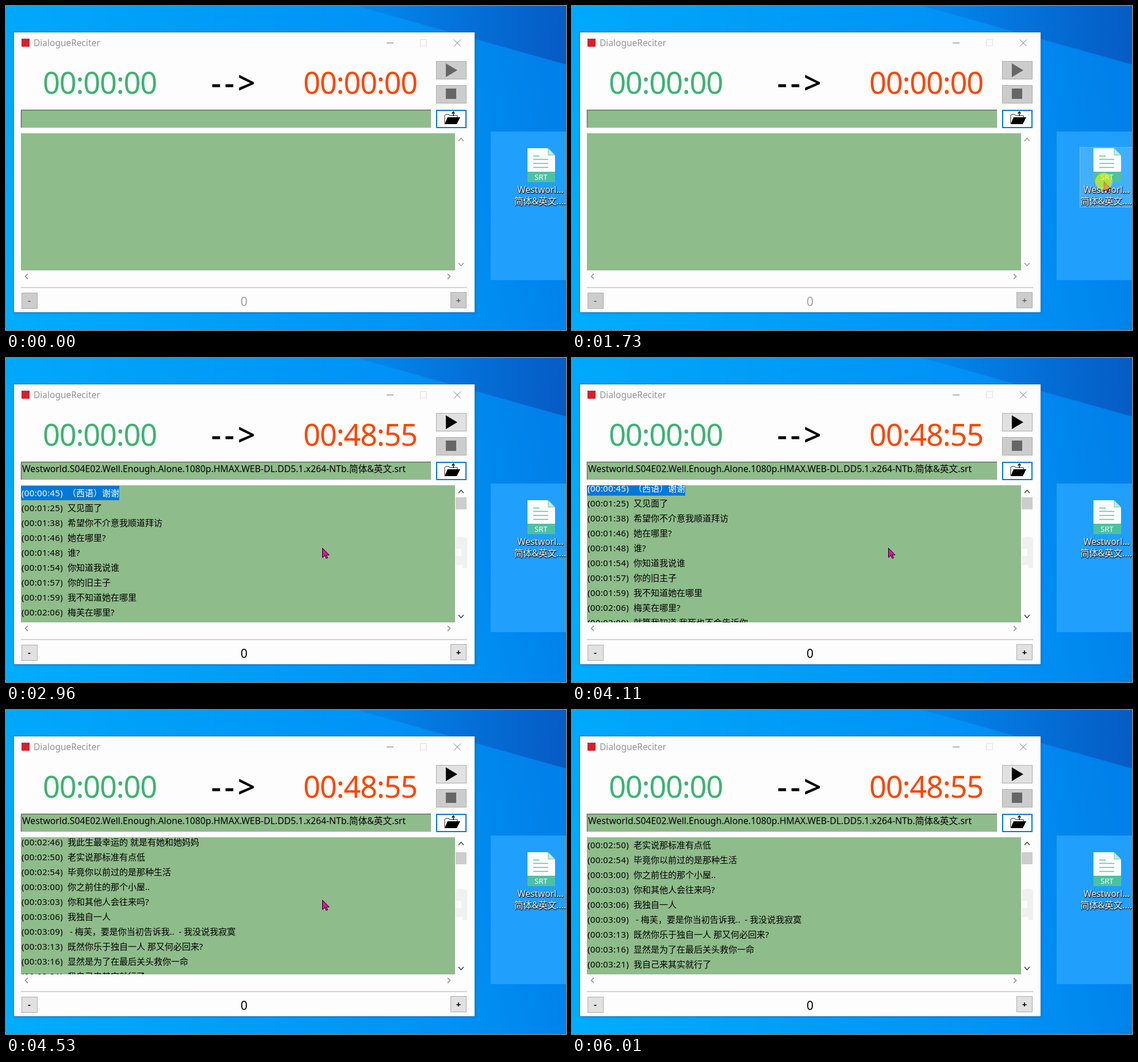
Animation, 974 px wide and 565 px high, one loop 6.47 s. Source, as an HTML page:

```html
<!DOCTYPE html>
<html lang="zh-CN">
<head>
<meta charset="utf-8">
<title>Subtitle player</title>
<style>
html, body { margin: 0; width: 100%; height: 100%; overflow: hidden; background: #0093f2; }
svg { display: block; font: 15px 'Noto Sans', 'Noto Sans CJK SC', sans-serif; --ink: #666; --face: #ccc; --arrow: #a0a0a0; }
svg.on { --ink: #000; --face: #e1e1e1; --arrow: #505050; }
text { white-space: pre; }
.big { font-size: 52.5px; letter-spacing: -1.3px; }
.mid { text-anchor: middle; }
.face { fill: var(--face); stroke: #adadad; }
.ink { fill: var(--ink); }
.chevron { fill: none; stroke: var(--arrow); stroke-width: 1.8; }
.side { fill: none; stroke: #a0a0a0; stroke-width: 1.8; }
.label { font-size: 15.5px; fill: #fff; text-shadow: 1px 1px 2px #000, 0 1px 1px #000; }
.loaded { visibility: hidden; }
.on .loaded { visibility: visible; }
</style>
</head>
<body>
<svg id="stage" width="974" height="565" viewBox="0 0 974 565">
  <defs>
    <linearGradient id="sky" gradientUnits="userSpaceOnUse" x1="0" y1="480" x2="974" y2="300">
      <stop offset="0" stop-color="#00acfc"/>
      <stop offset=".4" stop-color="#009df7"/>
      <stop offset=".75" stop-color="#0092f5"/>
      <stop offset="1" stop-color="#0080ea"/>
    </linearGradient>
    <linearGradient id="dusk" gradientUnits="userSpaceOnUse" x1="610" y1="0" x2="974" y2="30">
      <stop offset="0" stop-color="#0860cc" stop-opacity=".2"/>
      <stop offset="1" stop-color="#0850b8" stop-opacity=".75"/>
    </linearGradient>
    <clipPath id="listClip"><rect x="26" y="222" width="755" height="239"/></clipPath>
    <filter id="shadow" x="-5%" y="-5%" width="110%" height="112%">
      <feDropShadow dx="1" dy="1" stdDeviation="2" flood-color="#003a78" flood-opacity=".4"/>
    </filter>
  </defs>

  <!-- desktop -->
  <rect width="974" height="565" fill="url(#sky)"/>
  <path d="M610 0H974V102Z" fill="url(#dusk)"/>
  <rect x="843" y="219" width="259" height="259" fill="#20a0fc"/>

  <!-- file -->
  <rect id="hover" x="883.5" y="246.5" width="100" height="104" fill="#fff" fill-opacity=".16" stroke="#8fcfff" stroke-opacity=".7"/>
  <path d="M907 248H943L955 260V307H907Z" fill="#fcfefd"/>
  <path d="M943 248V260H955Z" fill="#bfe9dc" stroke="#50c3a5" stroke-width=".8"/>
  <path d="M907 289H955V307H907Z" fill="#4cc2a3"/>
  <path d="M917 261.500H928M917 267.500H943M917 274.500H943M917 281.500H943" stroke="#50c3a5" stroke-width="1.500"/>
  <text class="mid" x="930.500" y="303" font-size="13" fill="#fff">SRT</text>
  <text class="label mid" x="929.500" y="326">Westworl...</text>
  <text class="label mid" x="929" y="346">简体&amp;英文....</text>

  <!-- window -->
  <rect x="14" y="46" width="801" height="488" fill="#fdfdfd" filter="url(#shadow)"/>
  <rect x="13.500" y="45.500" width="802" height="489" fill="none" stroke="#1c6fae" stroke-opacity=".6"/>
  <rect x="27" y="57" width="14" height="14" fill="#d5202c"/>
  <text x="48" y="70" font-size="15.500" fill="#949494">DialogueReciter</text>
  <path d="M662 64.500H674M779 58.500L791 70.500M791 58.500L779 70.500" stroke="#777" fill="none"/>
  <rect x="720.500" y="58.500" width="11" height="11" fill="none" stroke="#dedede"/>

  <text class="big" x="64" y="152.500" fill="#3cb371">00:00:00</text>
  <text x="357" y="153" stroke="#000" stroke-width=".8" style="font-size:53px;letter-spacing:6px">--&gt;</text>
  <text class="big" id="total" x="517" y="152.500" fill="#ff4500">00:00:00</text>

  <rect class="face" x="748.500" y="96.500" width="52" height="31"/>
  <path class="ink" d="M765 100V124L785 112Z"/>
  <rect x="748.500" y="138.500" width="52" height="31" fill="#ccc" stroke="#adadad"/>
  <rect x="765" y="144" width="18" height="18" fill="#666"/>
  <rect x="749" y="182" width="51" height="30" fill="#fff" stroke="#0078d7" stroke-width="2"/>
  <path d="M763 205V191L765 189H770L772 191H785V194" fill="none" stroke="#222"/>
  <path d="M768 194H790L784 206H763Z"/>
  <path d="M778 192V185M775.500 187.500L778 184.500L780.500 187.500" fill="none" stroke="#000" stroke-width="1.300"/>

  <rect x="26" y="181" width="713" height="31.500" fill="#8fbc8b"/>
  <path d="M26.500 212V181.500H739" fill="none" stroke="#696969" stroke-width="1.500"/>
  <path d="M27 212.500H739.500V182" fill="none" stroke="#e3e3e3"/>
  <text class="loaded" x="28" y="199" font-size="15.750">Westworld.S04E02.Well.Enough.Alone.1080p.HMAX.WEB-DL.DD5.1.x264-NTb.简体&amp;英文.srt</text>

  <rect x="26" y="222" width="755" height="239" fill="#8fbc8b"/>
  <g clip-path="url(#listClip)"><g id="rows" class="loaded"></g></g>

  <path id="trough" d="M782 333V315Q784 312 792 312T802 315V366H794V361H782V345H792V333Z" fill="#f0f0f0"/>
  <rect id="thumb" class="loaded" x="782" y="243" width="19" height="21" fill="#cdcdcd"/>
  <path class="chevron" d="M787 235.500L791.500 230.500L796 235.500M787 448L791.500 453L796 448"/>
  <path class="side" d="M38 467L33.500 471.500L38 476M768 467L772.500 471.500L768 476"/>

  <path d="M26 491H802" stroke="#a8a8a8"/>
  <rect class="face" x="27.500" y="500.500" width="27" height="27"/>
  <rect class="face" x="773.500" y="499.500" width="27" height="27"/>
  <g class="ink mid" font-weight="700"><text x="40.500" y="519">-</text><text x="787" y="518.500">+</text></g>
  <text id="offset" class="mid" x="414" y="523" font-size="21">0</text>

  <!-- pointer -->
  <g id="pointer">
    <path id="arrow" d="M.5 .5V17L4.500 13.500L7 18.500L9.500 17.500L7 12.500H12Z" stroke="#000"/>
    <g id="badge">
      <path d="M1 16V24H9M1 18H9" fill="none" stroke="#000" stroke-width="2" stroke-dasharray="3 1"/>
      <rect x="10.500" y="20.500" width="10" height="10" fill="#fff" stroke="#000"/>
      <path d="M13 25.500H18M15.500 23V28" stroke="#000"/>
    </g>
    <circle id="press" r="15" fill="#eef500" fill-opacity=".6"/>
  </g>
</svg>
<script>
const LOOP = 6470, ROW = 26, LOAD = 2880, SCROLL = 4110;
const $ = id => document.getElementById(id);
const show = (id, on) => $(id).style.display = on ? '' : 'none';

const lines = `00:45|（西语）谢谢
01:25|又见面了
01:38|希望你不介意我顺道拜访
01:46|她在哪里?
01:48|谁?
01:54|你知道我说谁
01:57|你的旧主子
01:59|我不知道她在哪里
02:06|梅芙在哪里?
02:09|就算我知道 我死也不会告诉你
02:16|乐意从命
02:38|你女儿
02:41|好可爱
02:44|肯定是多亏了你妻子的遗传
02:46|我此生最幸运的 就是有她和她妈妈
02:50|老实说那标准有点低
02:54|毕竟你以前过的是那种生活
03:00|你之前住的那个小屋..
03:03|你和其他人会往来吗?
03:06|我独自一人
03:09| - 梅芙，要是你当初告诉我..  - 我没说我寂寞
03:13|既然你乐于独自一人 那又何必回来?
03:16|显然是为了在最后关头救你一命
03:21|我自己来其实就行了`.split('\n');

$('rows').innerHTML = '<rect x="26" y="223" width="171" height="25" fill="#0078d7"/>' +
  lines.map((line, i) => {
    const [time, words] = line.split('|'), y = 241 + i * ROW;
    return `<g fill="${i ? '#000' : '#fff'}"><text x="27" y="${y}" letter-spacing=".35">(00:${time})</text>` +
      `<text x="107" y="${y}">${words}</text></g>`;
  }).join('');

// keys: [time, ...values]
const path = [
  [740, 950, 556], [1150, 925, 306], [1730, 925, 306], [1900, 885, 318],
  [2120, 790, 332], [2210, 746, 334], [2310, 696, 330], [2370, 657, 330],
  [2550, 550, 331], [5229, 550, 331], [5230, 563, 328], [5440, 644, 298],
  [5680, 644, 298], [5870, 676, 452], [6010, 707, 565]
];
const scrollKeys = [[SCROLL - 1, 0], [SCROLL, 8], [4370, 242], [4560, 390]];

function at(keys, t) {
  const n = keys.findIndex(k => k[0] > t);
  if (n < 0) return keys[keys.length - 1].slice(1);
  if (n === 0) return keys[0].slice(1);
  const a = keys[n - 1], b = keys[n], u = (t - a[0]) / (b[0] - a[0]);
  return a.slice(1).map((v, i) => v + (b[i + 1] - v) * u);
}

function draw(t) {
  const loaded = t >= LOAD, dragging = t >= 1770 && !loaded;
  const [x, y] = at(path, t);
  $('stage').classList.toggle('on', loaded);
  $('total').textContent = loaded ? '00:48:55' : '00:00:00';
  $('offset').setAttribute('fill', loaded ? '#000' : '#a0a0a0');

  // the list advances in discrete ticks
  const tick = t < SCROLL ? t : SCROLL + Math.floor((t - SCROLL) / 32.1) * 32.5;
  const scroll = Math.round(at(scrollKeys, tick)[0]);
  $('rows').setAttribute('transform', `translate(0 ${-scroll})`);
  $('thumb').setAttribute('y', 243 + Math.round(scroll / 78));

  show('hover', t >= 740 && t < LOAD && x >= 883 && y <= 351);
  show('trough', t >= 2150);
  show('pointer', t >= 740 && t < 6010);
  show('press', t >= 1730 && !loaded);
  show('badge', dragging);
  $('arrow').setAttribute('fill', dragging ? '#fff' : '#ff00b4');
  $('pointer').setAttribute('transform', `translate(${Math.round(x)} ${Math.round(y)})`);
}

const start = performance.now();
function frame() {
  draw((performance.now() - start) % LOOP);
  requestAnimationFrame(frame);
}
frame();
</script>
</body>
</html>
```
